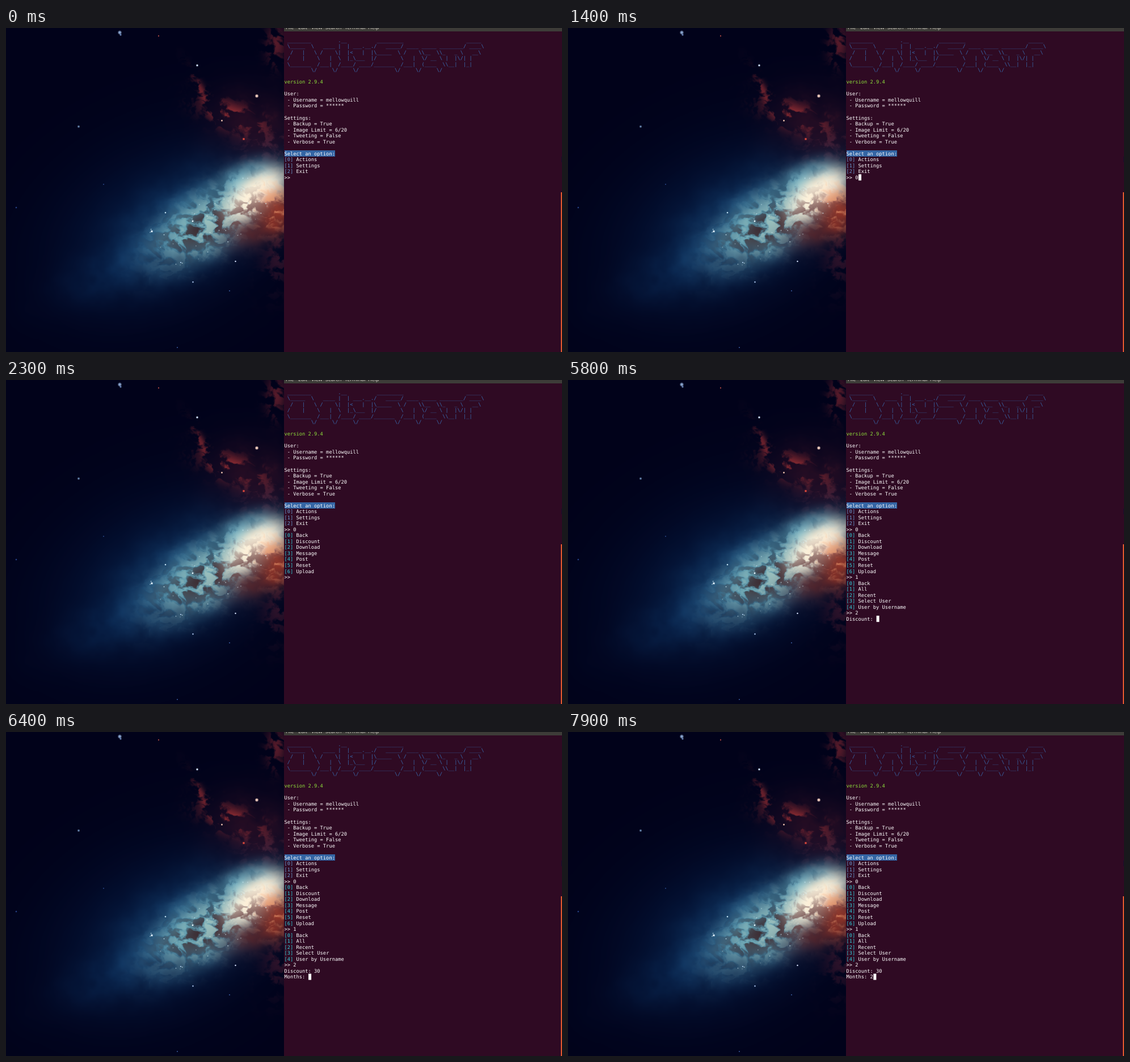
These frames come from a looping animation (980x572 px, 8000 ms). An HTML page with a canvas:

```html
<!DOCTYPE html>
<html lang="en">
<head>
<meta charset="utf-8">
<title>Terminal session</title>
<style>
  html, body { margin: 0; width: 980px; height: 572px; overflow: hidden; background: #01021a; }
  body { position: relative; --cw: 5.262px; --lh: 10.53px; }
  canvas, #term, #term > * { position: absolute; }
  canvas { left: 0; top: 0; }
  #term { left: 490px; top: 0; width: 490px; height: 572px; overflow: hidden; background: #2f0a23; }

  #menu { left: 0; top: 0; width: 490px; height: 5.5px; overflow: hidden; background: #3d3c38; }
  #menu span {
    position: absolute; top: -6px; color: #dfdbd2;
    font: 9px/10px "Open Sans", "Noto Sans", sans-serif; text-rendering: geometricPrecision;
  }
  #bar { right: 0; top: 289.5px; width: 2.5px; height: 283px; background: #e2592f; }
  #notch { right: 0; top: 227px; width: 1px; height: 10px; background: #15102c; }
  #mark { left: .5px; top: 216.3px; width: calc(17 * var(--cw)); height: 10.6px; background: #3465a4; }

  pre {
    left: .5px; top: 17.6px; margin: 0; color: #fff;
    font: 8.74px/10.53px "DejaVu Sans Mono", "Liberation Mono", monospace;
    font-variant-ligatures: none; text-rendering: geometricPrecision;
  }
  pre b, pre i { font: inherit; color: #6d9bd0; }
  pre i { color: #34d0dc; }
  .art { color: #3a6cb0; }
  .ver { color: #8ee03c; }

  /* Output that appears and stays until the loop ends */
  .out { opacity: 0; animation: 8s step-end infinite; }
  .pick0 { animation-name: pick0; }
  .actions { animation-name: actions; }
  .targets { animation-name: targets; }
  .digit3 { animation-name: digit3; }
  .digit0 { animation-name: digit0; }
  .months { animation-name: months; }
  .digit2 { animation-name: digit2; }
  @keyframes pick0 { 17.5% { opacity: 1 } }
  @keyframes actions { 21.25% { opacity: 1 } }
  @keyframes targets { 72.5% { opacity: 1 } }
  @keyframes digit3 { 75% { opacity: 1 } }
  @keyframes digit0 { 77.5% { opacity: 1 } }
  @keyframes months { 80% { opacity: 1 } }
  @keyframes digit2 { 98.75% { opacity: 1 } }

  #cursor {
    left: .5px; top: 16.2px; width: var(--cw); height: var(--lh);
    background: #fff; animation: cursor 8s step-end infinite;
  }
  @keyframes cursor {
    0%     { opacity: 0; transform: translate(calc(3 * var(--cw)), calc(23 * var(--lh))) }
    7.5%   { opacity: 1; transform: translate(calc(3 * var(--cw)), calc(23 * var(--lh))) }
    15%    { opacity: 0; transform: translate(calc(3 * var(--cw)), calc(23 * var(--lh))) }
    17.5%  { opacity: 1; transform: translate(calc(4 * var(--cw)), calc(23 * var(--lh))) }
    21.25% { opacity: 1; transform: translate(calc(3 * var(--cw)), calc(31 * var(--lh))) }
    28.75% { opacity: 0; transform: translate(calc(3 * var(--cw)), calc(31 * var(--lh))) }
    72.5%  { opacity: 1; transform: translate(calc(10 * var(--cw)), calc(38 * var(--lh))) }
    75%    { opacity: 1; transform: translate(calc(11 * var(--cw)), calc(38 * var(--lh))) }
    77.5%  { opacity: 1; transform: translate(calc(12 * var(--cw)), calc(38 * var(--lh))) }
    80%    { opacity: 1; transform: translate(calc(8 * var(--cw)), calc(39 * var(--lh))) }
    87.5%  { opacity: 0; transform: translate(calc(8 * var(--cw)), calc(39 * var(--lh))) }
    96.25% { opacity: 1; transform: translate(calc(8 * var(--cw)), calc(39 * var(--lh))) }
    98.75%, 100% { opacity: 1; transform: translate(calc(9 * var(--cw)), calc(39 * var(--lh))) }
  }
</style>
</head>
<body>
<canvas id="sky" width="490" height="572"></canvas>
<div id="term">
  <div id="menu">
    <span style="left:3px">File</span><span style="left:25px">Edit</span>
    <span style="left:48px">View</span><span style="left:73px">Search</span>
    <span style="left:107px">Terminal</span><span style="left:148px">Help</span>
  </div>
  <div id="bar"></div>
  <div id="notch"></div>
  <div id="mark"></div>
<pre><span class="art"> ________         .__          _________                     _____
 \_____  \   ____ |  | ___.__./   _____/ ____ _____ ________/ ____\
  /   |   \ /    \|  |&lt;   |  |\_____  \ /    \\__  \\_   _ \   __\
 /    |    \   |  \  |_\___  |/        \   |  \/ __ \ |  |\/| |
 \_______  /___|  /____/ ____/_______  /___|  (____  \\__|  |_|
         \/     \/     \/            \/     \/     \/</span>

<span class="ver">version 2.9.4</span>

User:
 - Username = mellowquill
 - Password = ******

Settings:
 - Backup = True
 - Image Limit = 6/20
 - Tweeting = False
 - Verbose = True

Select an option:
<b>[0]</b> Actions
<b>[1]</b> Settings
<b>[2]</b> Exit
&gt;&gt; <span class="out pick0">0</span>
<span class="out actions"><i>[0]</i> Back
<i>[1]</i> Discount
<i>[2]</i> Download
<i>[3]</i> Message
<i>[4]</i> Post
<i>[5]</i> Reset
<i>[6]</i> Upload
&gt;&gt; </span><span class="out targets">1
<i>[0]</i> Back
<i>[1]</i> All
<i>[2]</i> Recent
<i>[3]</i> Select User
<i>[4]</i> User by Username
&gt;&gt; 2
Discount: </span><span class="out digit3">3</span><span class="out digit0">0</span>
<span class="out months">Months: </span><span class="out digit2">2</span></pre>
  <div id="cursor"></div>
</div>
<script>
const canvas = document.getElementById('sky');
const ctx = canvas.getContext('2d');
const { width: W, height: H } = canvas;
const clamp = v => Math.max(0, Math.min(1, v));
const rgb = hex => [1, 3, 5].map(i => parseInt(hex.slice(i, i + 2), 16));

function hash(x, y) {
  let h = Math.imul(x, 374761393) ^ Math.imul(y, 668265263);
  h = Math.imul(h ^ h >>> 13, 1274126177);
  return ((h ^ h >>> 16) >>> 0) / 2 ** 32;
}
function noise(x, y) {
  const i = Math.floor(x), j = Math.floor(y);
  let u = x - i, v = y - j;
  u *= u * (3 - 2 * u);
  v *= v * (3 - 2 * v);
  const top = hash(i, j) * (1 - u) + hash(i + 1, j) * u;
  const low = hash(i, j + 1) * (1 - u) + hash(i + 1, j + 1) * u;
  return top * (1 - v) + low * v;
}
function fbm(x, y) {
  let sum = 0;
  for (let k = 0, amp = .53; k < 4; k++, amp /= 2, x *= 2, y *= 2) sum += amp * noise(x + k * 17, y);
  return sum;
}

// Each cloud is a tilted soft ellipse; edge sets how crisp it is.
const PLAIN = 0, SOFT = 1, DUST = 2, SPECKS = 3;
const clouds = [];
function cloud(x, y, rx, ry, tilt, color, alpha, texture = PLAIN, edge = 1) {
  const a = tilt * Math.PI / 180;
  clouds.push({ x, y, rx, ry, cos: Math.cos(a), sin: Math.sin(a), color: rgb(color), alpha, texture, edge });
}
// sky and halo
cloud(270, 350, 190, 130, -28, '#04214e', .6);
cloud(215, 415, 120, 38, -24, '#0b3364', .4, SOFT);
cloud(335, 338, 135, 68, -32, '#1f5a8c', .75, SOFT);
// red nebula
cloud(435, 170, 70, 58, 15, '#3a1024', .6, SOFT);
cloud(403, 157, 58, 22, 22, '#c03a38', .75, SPECKS);
cloud(343, 110, 42, 8, 62, '#a03034', .6, SPECKS);
cloud(476, 28, 18, 36, 0, '#8c2a34', .6, SPECKS);
cloud(465, 210, 48, 26, 0, '#5e2c44', .45, SPECKS);
cloud(482, 400, 28, 58, 10, '#481a30', .6, SPECKS);
// galaxy
cloud(365, 337, 125, 55, -32, '#5f9fb0', .8, SOFT, 1.7);
cloud(425, 270, 58, 30, -25, '#78b8ca', .7, SOFT, 1.5);
cloud(370, 338, 95, 42, -32, '#c4dccc', .6, SPECKS);
cloud(350, 350, 80, 34, -28, '#3a2226', .9, DUST);
cloud(395, 278, 60, 18, -28, '#28506c', .7, DUST);
cloud(446, 350, 58, 30, -25, '#5a2024', .8, SOFT);
cloud(440, 294, 64, 32, -38, '#fff5df', 1, PLAIN, 1.8);
cloud(474, 325, 30, 34, 0, '#b03c26', .75, SOFT, 1.5);
cloud(470, 312, 34, 36, 0, '#f4a878', .7, SPECKS);
cloud(425, 325, 50, 26, -30, '#54262a', .65, DUST);

function paintSky() {
  const img = ctx.createImageData(W, H);
  const base = rgb('#01021a');
  for (let y = 0, p = 0; y < H; y++) {
    for (let x = 0; x < W; x++, p += 4) {
      const a = fbm(x / 34, y / 34);
      const b = fbm(x / 15 + a * 2 + 9, y / 12 + a * 2);
      const fields = [1, .5 + a, clamp((.52 - b) * 7), clamp((b - .47) * 6)];
      let [r, g, bl] = base;
      for (const c of clouds) {
        const dx = x - c.x, dy = y - c.y;
        const u = (dx * c.cos + dy * c.sin) / c.rx;
        const v = (dy * c.cos - dx * c.sin) / c.ry;
        const d = u * u + v * v;
        if (d > 5) continue;
        const m = clamp(c.alpha * Math.exp(-(d ** c.edge)) * fields[c.texture]);
        r += (c.color[0] - r) * m;
        g += (c.color[1] - g) * m;
        bl += (c.color[2] - bl) * m;
      }
      img.data.set([r, g, bl, 255], p);
    }
  }
  ctx.putImageData(img, 0, 0);
}

function star(x, y, r, color, alpha = 1) {
  const glow = ctx.createRadialGradient(x, y, 0, x, y, r);
  glow.addColorStop(0, color);
  glow.addColorStop(.35, color);
  glow.addColorStop(1, color + '00');
  ctx.globalAlpha = alpha;
  ctx.fillStyle = glow;
  ctx.fillRect(x - r, y - r, 2 * r, 2 * r);
}

paintSky();
star(200.5, 8, 4, '#9ab8e4', .9);
star(202, 12, 2.2, '#7f9fd8', .8);
star(337, 66, 2.4, '#d8e8ff');
star(442, 120, 3.6, '#ffd8c8');
star(128, 174, 2.6, '#7fa4d0', .8);
star(380.5, 163.5, 2, '#ffd0b8');
star(419, 196, 2.6, '#e04a3c');
star(269, 14, 1.6, '#c05048');
star(257, 359, 2.4, '#e8f6ff');
star(404.5, 412, 1.8, '#d8e4ff');
star(329.5, 448.5, 1.8, '#a8c0e8');
star(308, 414, 1.6, '#a8c8e8');
star(281, 326, 1.8, '#c8e8f8');
star(329, 341, 2, '#e8f8ff');
star(18, 317, 1.8, '#28448c');
star(172, 276, 1.5, '#284480');
star(394, 464, 1.5, '#385898');
star(302, 564, 1.5, '#385898');
for (let i = 0; i < 45; i++) {
  const along = hash(i, 3) * 210 - 105, off = hash(i, 5) * 90 - 45;
  star(360 + along * .85 + off * .5, 345 - along * .5 + off * .85, 1.4, '#d4ecf4', .2 + .5 * hash(i, 7));
}
</script>
</body>
</html>
```
